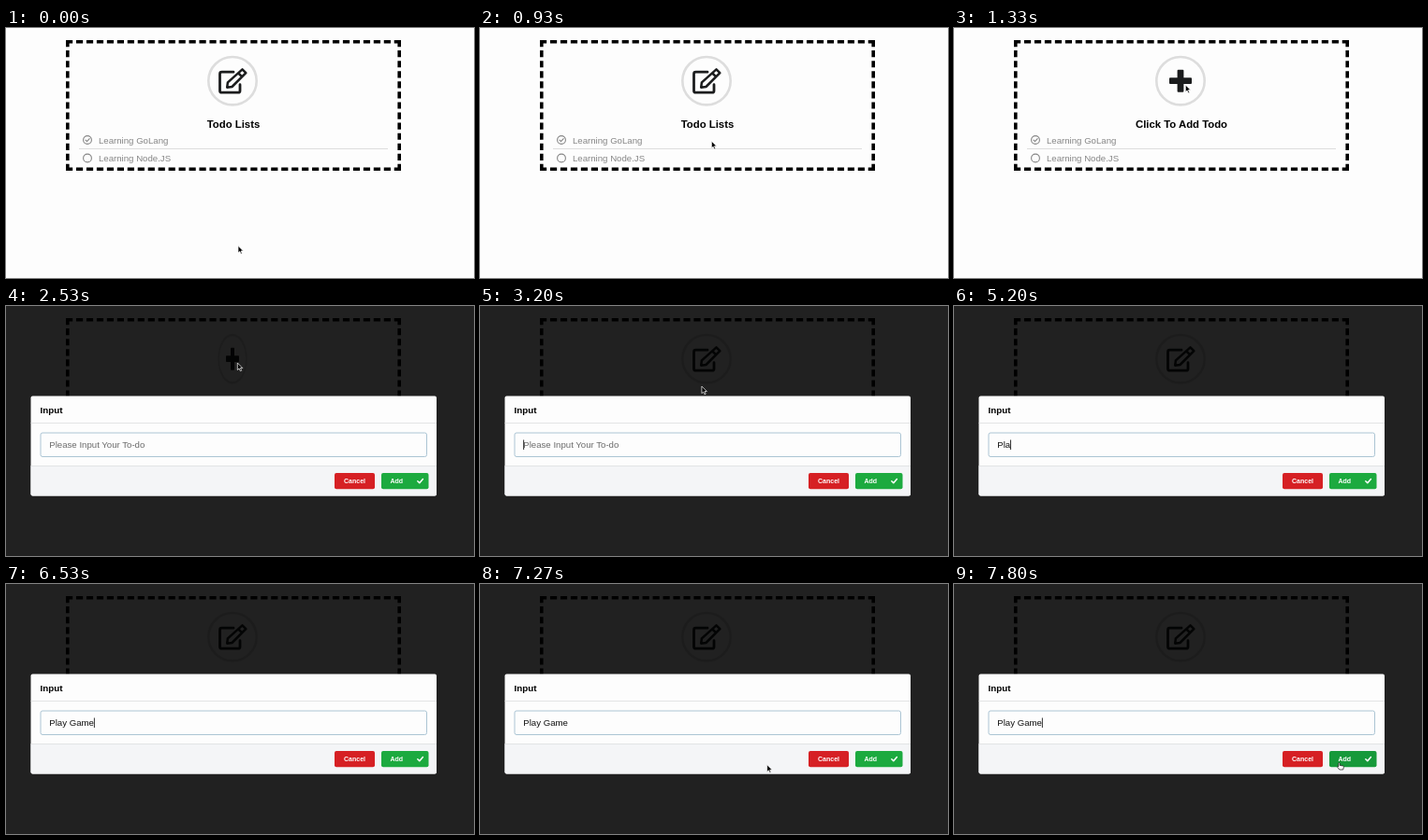
Write an HTML page that moves like this. It is 500x268 px and loops after 8 s.

```html
<!DOCTYPE html>
<html lang="en">
<head>
<meta charset="utf-8">
<title>Todo lists</title>
<style>
  html, body { margin: 0; width: 100%; height: 100%; overflow: hidden; background: #fdfdfd; }
  svg { display: block; width: 500px; height: 268px; }
  text { font-family: "Liberation Sans", Arial, sans-serif; font-size: 9.65px; white-space: pre; }
  .bold { font-weight: bold; }
  .line { fill: none; stroke-linecap: round; stroke-linejoin: round; }
  .list { fill: #858585; }
  .list .line { stroke: #858585; stroke-width: 1.1; }
  .icon { stroke: #1b1c1d; stroke-width: 2.8; }
  .button { font-size: 7px; fill: #fff; }
</style>
</head>
<body>
<svg viewBox="0 0 500 268">
  <g stroke="#000" stroke-width="3.6">
    <path stroke-dasharray="7.2 3.76" d="M64 14.8H422M64 151.2H422"/>
    <path stroke-dasharray="7.2 3.87" d="M65.8 13V153M420.2 13V153"/>
  </g>

  <g id="badge">
    <circle r="25.7" fill="none" stroke="#ddd" stroke-width="2.6"/>
    <g id="edit" class="line icon">
      <path d="M1-9.5H-11.5Q-13.5-9.5-13.5-7.5V10.5Q-13.5 12.5-11.5 12.5H6Q8 12.5 8 10.5V4"/>
      <path stroke-width="2.5" d="M10.5-12.3 14.3-8.5-.5 6.3-5.8 7-5.1 1.7ZM6.4-8.2 10.2-4.4"/>
    </g>
    <path id="plus" fill="#1b1c1d" stroke="#1b1c1d" stroke-width="2" stroke-linejoin="round"
      d="M-2.4-11H2.4V-2.4H11V2.4H2.4V11H-2.4V2.4H-11V-2.4H-2.4Z"/>
  </g>
  <text id="label" class="bold" x="243" y="107.3" text-anchor="middle" style="font-size:11.35px"></text>

  <g class="list">
    <circle class="line" cx="87" cy="120" r="4.4"/>
    <path class="line" d="M85 120.2 86.5 121.7 89.2 118.7"/>
    <text x="99" y="123.6">Learning GoLang</text>
    <path d="M78 129.5H408" stroke="#ddd"/>
    <circle class="line" cx="87" cy="139.5" r="4.4"/>
    <text x="99" y="143.1">Learning Node.JS</text>
  </g>

  <g id="modal">
    <rect width="500" height="268" opacity=".87"/>
    <rect x="26.5" y="96.5" width="433.5" height="107" rx="2" fill="#fdfdfd"/>
    <path d="M26.5 171.5H460V201.5Q460 203.5 458 203.5H28.5Q26.5 203.5 26.5 201.5Z" fill="#f4f5f7"/>
    <path d="M26.5 125.5H460M26.5 171.5H460" stroke="#dedfe0" stroke-width=".8"/>
    <text class="bold" x="36.5" y="115" style="font-size:9.8px">Input</text>
    <rect x="37" y="136" width="412.5" height="25.5" rx="2" fill="#fdfdfd" stroke="#a3bfd0" stroke-width=".9"/>
    <text id="field" x="46.3" y="152.2"></text>
    <rect id="caret" y="143.5" width=".8" height="10.5"/>
    <rect x="351" y="179" width="43" height="17.3" rx="2" fill="#d62024"/>
    <rect id="add" x="401" y="179" width="50.5" height="17.3" rx="2"/>
    <text class="bold button" x="372.5" y="190.2" text-anchor="middle">Cancel</text>
    <text class="bold button" x="417.3" y="190.2" text-anchor="middle">Add</text>
    <path class="line" stroke="#fff" stroke-width="1.5" d="M439.8 187.8 441.8 189.8 445.4 185.6"/>
  </g>

  <g id="cursor">
    <path id="arrow" stroke="#fff" stroke-width=".7" d="M0 0V7.6L1.8 6 3 8.7 4.3 8.2 3.1 5.5H5.5Z"/>
    <path id="beam" class="line" stroke="#222" stroke-width=".9"
      d="M-1.6-4Q0-4 0-3V3Q0 4-1.6 4M1.6-4Q0-4 0-3M0 3Q0 4 1.6 4"/>
    <path id="hand" fill="#fff" stroke="#111" stroke-width=".7" stroke-linejoin="round"
      d="M-.7 4.2V.6Q0-.5.7.6V2.9L4.2 3.5Q5 3.8 4.8 5L4.2 7.5H.3L-2 4.6Q-1.8 3.4-.7 4.2Z"/>
  </g>
</svg>
<script>
const LOOP = 8000, OPEN = 2530, TYPE = 4530;
const $ = id => document.getElementById(id);
const show = (id, on) => $(id).style.display = on ? '' : 'none';
const ramp = (t, a, b) => Math.min(1, Math.max(0, (t - a) / (b - a)));
const ease = p => p * p * (3 - 2 * p);
const mix = (a, b, p) => a + (b - a) * p;

// Each leg: start, end, from, to, and an optional bend point.
const legs = [
  [70, 130, [248, 233.5], [247.5, 233.3]],
  [600, 1150, [247.5, 233.3], [247.3, 61]],
  [2930, 3730, [247.3, 61], [208.3, 155]],
  [6930, 7730, [208.3, 155], [411.5, 191.5], [350, 225]],
];
const typed = 'Play Game';
const keys = [4530, 4870, 5200, 5400, 5600, 6000, 6270, 6470, 6530];

function pointer(t) {
  const [a, b, from, to, bend] = legs.filter(l => t >= l[0]).pop() || legs[0];
  const p = ease(ramp(t, a, b));
  return [0, 1].map(i => bend
    ? mix(mix(from[i], bend[i], p), mix(bend[i], to[i], p), p)
    : mix(from[i], to[i], p));
}

function drawBadge(t) {
  const turn = t < OPEN ? ramp(t, 1000, 1330) : 1 - mix(.3, 1, ramp(t, OPEN, 2730));
  const plus = turn > .5;
  $('badge').setAttribute('transform',
    `translate(242 56.7) scale(${Math.abs(Math.cos(turn * Math.PI))} 1)`);
  show('plus', plus);
  show('edit', !plus);
  $('label').textContent = t >= 1000 && t < OPEN ? 'Click To Add Todo' : 'Todo Lists';
}

function drawField(t) {
  const count = keys.filter(k => t >= k).length;
  const field = $('field');
  field.textContent = count ? typed.slice(0, count) : 'Please Input Your To-do';
  field.setAttribute('fill', count ? '#111' : '#6b6b6b');
  const since = t - (count ? keys[count - 1] : 3000);
  show('caret', since >= 0 && since % 1000 < 500);
  $('caret').setAttribute('x', 46.3 + (count ? field.getComputedTextLength() : 0));
}

function drawCursor(t, open) {
  const [x, y] = pointer(t);
  const inside = (l, top, r, b) => open && x > l && x < r && y > top && y < b;
  const beam = inside(37, 136, 449, 161), hand = inside(401, 179, 452, 196);
  $('cursor').setAttribute('transform', `translate(${x} ${y})`);
  show('cursor', t < TYPE || t >= 6930);
  show('beam', beam);
  show('hand', hand);
  show('arrow', !beam && !hand);
  $('add').setAttribute('fill', hand ? '#16993a' : '#1caa3f');
}

function frame(now) {
  const t = now % LOOP, open = t >= OPEN;
  show('modal', open);
  drawBadge(t);
  if (open) drawField(t);
  drawCursor(t, open);
  requestAnimationFrame(frame);
}

const start = performance.now();
frame(0);
function tick() { return performance.now() - start; }
</script>
</body>
</html>
```
